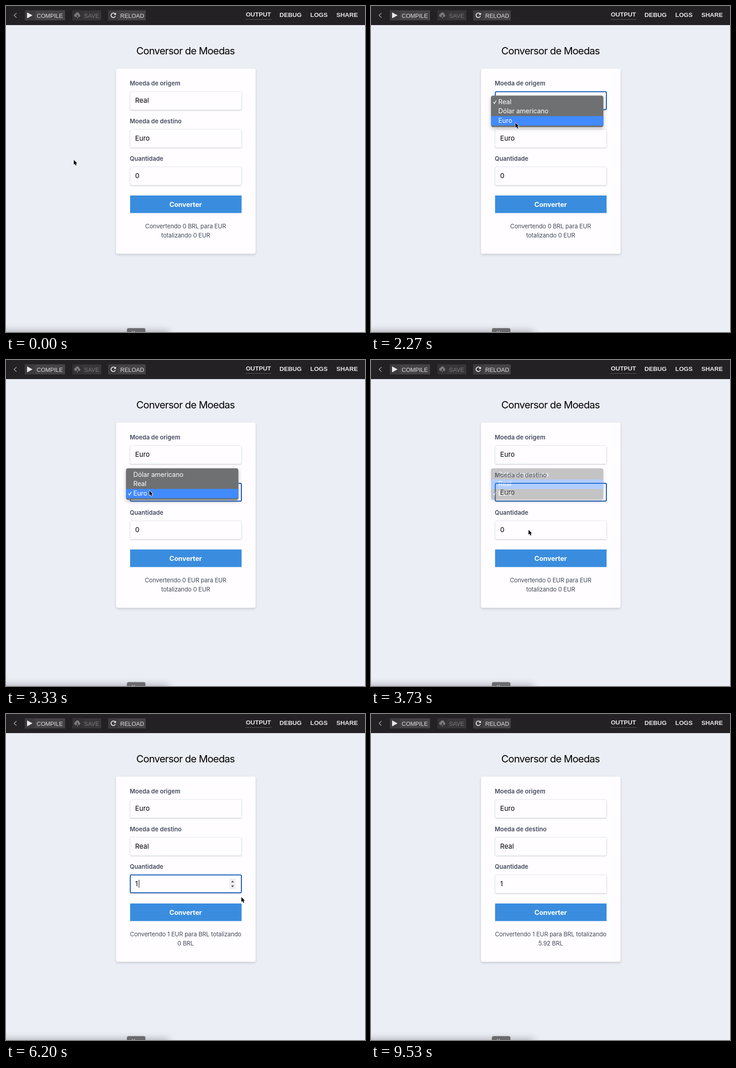
These frames come from a looping animation (784 px wide and 714 px high, 9.99 s). An HTML page:

```html
<!DOCTYPE html>
<html lang="pt">
<head>
<meta charset="utf-8">
<title>Conversor de Moedas</title>
<style>
html, body { margin: 0; width: 100%; height: 100%; overflow: hidden; background: #ebeef5 }
svg { display: block; width: 784px; height: 714px; font-family: Inter, "Noto Sans", sans-serif; font-optical-sizing: none }
text { white-space: pre }
.bar { font: 12.7px "Liberation Sans", Arial, sans-serif; fill: #dedddf }
.tab { font: bold 13.4px "Liberation Sans", Arial, sans-serif; fill: #e6e5e7 }
.label { font-size: 13.1px; font-weight: 600; fill: #434a5f }
.value { font-size: 14.8px; fill: #000 }
.result { font-size: 13px; letter-spacing: -.14px; fill: #434a5a; text-anchor: middle }
.item { font-size: 14.3px; letter-spacing: -.1px; fill: #fff }
.box { fill: #fffdff; stroke: #e1e6ef; stroke-width: 1 }
.ring { fill: none; stroke: #0d55b7; stroke-width: 2 }
</style>
</head>
<body>
<svg viewBox="0 0 784 714">
  <defs>
    <filter id="cardShadow" x="-10%" y="-10%" width="120%" height="120%">
      <feDropShadow dx="0" dy="2.5" stdDeviation="2.5" flood-color="#000" flood-opacity=".16"/>
    </filter>
    <filter id="boxShadow" x="-5%" y="-20%" width="110%" height="150%">
      <feDropShadow dx="0" dy="1.2" stdDeviation="1" flood-color="#000" flood-opacity=".17"/>
    </filter>
    <filter id="menuShadow" x="-10%" y="-20%" width="120%" height="160%">
      <feDropShadow dx="0" dy="3" stdDeviation="4" flood-color="#000" flood-opacity=".25"/>
    </filter>
    <filter id="blur" x="-20%" y="-100%" width="140%" height="300%"><feGaussianBlur stdDeviation="9"/></filter>
  </defs>

  <rect width="784" height="714" fill="#ebeef5"/>
  <rect width="784" height="41.5" fill="#232124"/>
  <path d="M0 41H784" stroke="#171518"/>
  <path d="M23 15.5L17.5 20.5L23 25.5" fill="none" stroke="#a9a8aa" stroke-width="1.4"/>
  <g fill="#454346">
    <rect x="41" y="9.5" width="88" height="22"/>
    <rect x="145" y="9.5" width="63" height="22" fill="#383639"/>
    <rect x="223" y="9.5" width="82" height="22"/>
  </g>
  <g fill="#3d3b3e">
    <rect x="41" y="9.5" width="22" height="22"/>
    <rect x="145" y="9.5" width="22" height="22" fill="#343235"/>
    <rect x="223" y="9.5" width="22" height="22"/>
  </g>
  <path d="M46 14V27L58 20.5Z" fill="#e8e7e9"/>
  <g fill="#7b797c">
    <circle cx="152.5" cy="20.5" r="3.5"/><circle cx="156" cy="17.8" r="3.8"/><circle cx="159.3" cy="21" r="3"/>
    <rect x="152" y="19" width="7.5" height="5"/>
    <path d="M155 22H157V27H155Z"/>
    <path d="M153.3 22.3L156 19.3L158.7 22.3H157V24.5H155V22.3Z" fill="#383639"/>
  </g>
  <path d="M238.3 17.3A4.9 4.9 0 1 0 239 22" fill="none" stroke="#e8e7e9" stroke-width="1.9"/>
  <path d="M240.3 14.5V19.6H235.2Z" fill="#e8e7e9"/>
  <g class="bar">
    <text x="67" y="25.6">COMPILE</text>
    <text x="170.5" y="25.6" style="fill:#7b797c">SAVE</text>
    <text x="249.5" y="25.6">RELOAD</text>
  </g>
  <g class="tab">
    <text x="523.7" y="23.2">OUTPUT</text>
    <text x="597.3" y="23.6">DEBUG</text>
    <text x="664.5" y="23.6">LOGS</text>
    <text x="721.5" y="23.6">SHARE</text>
  </g>
  <path d="M523 29.5H580" stroke="#59575a"/>

  <text x="392" y="106" font-size="22" letter-spacing="-.8" text-anchor="middle">Conversor de Moedas</text>
  <rect x="240.5" y="137" width="304.5" height="405.5" rx="4" fill="#fffdff" filter="url(#cardShadow)"/>
  <g id="fields"></g>
  <rect x="271" y="415" width="243.5" height="38.5" fill="#3a8dde"/>
  <rect id="buttonRing" class="ring" x="271" y="415.3" width="243.6" height="38" rx="1.5"/>
  <text x="392.2" y="439.7" font-size="14.6" font-weight="700" letter-spacing="-.1" fill="#fff" text-anchor="middle">Converter</text>
  <text id="line1" class="result" x="392.3" y="486.8"></text>
  <text id="line2" class="result" x="392.3" y="506.5"></text>

  <g id="spinner">
    <rect x="488" y="360.5" width="13.5" height="23" rx="1" fill="#efedef"/>
    <path d="M491.8 368.8L494.7 365L497.6 368.8ZM491.8 375.6L494.7 379.4L497.6 375.6Z" fill="#444"/>
  </g>
  <path id="caret" stroke="#000" stroke-width="1"/>
  <g id="menus"></g>

  <rect x="-40" y="713" width="395" height="40" fill="#000" opacity=".3" filter="url(#blur)"/>
  <rect x="264" y="705.5" width="40.5" height="20" rx="4" fill="#6b6b6e"/>
  <text x="274" y="721" font-size="12" fill="#eee">Kor</text>

  <g id="pointer" stroke-linejoin="round">
    <path id="arrow" d="M0 0V10.6L2.4 8.4L4.2 12.4L6.1 11.6L4.4 7.7H7.6Z" fill="#000" stroke="#fff" stroke-width="1.6" paint-order="stroke"/>
    <g id="beam" fill="none">
      <path d="M-3 -7.5Q0 -7.5 0 -5V5Q0 7.5 -3 7.5M3 -7.5Q0 -7.5 0 -5M0 5Q0 7.5 3 7.5M-1.8 2H1.8" stroke="#fff" stroke-width="2.6" opacity=".8"/>
      <path d="M-3 -7.5Q0 -7.5 0 -5V5Q0 7.5 -3 7.5M3 -7.5Q0 -7.5 0 -5M0 5Q0 7.5 3 7.5M-1.8 2H1.8" stroke="#222" stroke-width="1.1"/>
    </g>
  </g>
</svg>
<script>
const LOOP = 9990, FRAME = 200 / 3, ROW = 20.6;
const $ = id => document.getElementById(id);
const show = (el, on) => el.style.display = on ? '' : 'none';
const within = (t, a, b) => t >= a && t < b;

const labels = ['Moeda de origem', 'Moeda de destino', 'Quantidade'];
$('fields').innerHTML = labels.map((label, i) => {
  const y = 187.5 + i * 82.4;
  return `<text class="label" x="270.3" y="${y - 13.2}">${label}</text>
    <rect class="box" x="271" y="${y}" width="243.5" height="40" rx="3" filter="url(#boxShadow)"/>
    <rect class="ring" x="271.5" y="${y + .2}" width="242.5" height="39" rx="2.5"/>
    <text class="value" x="282" y="${y + 24.9}"></text>`;
}).join('');
const values = document.querySelectorAll('.value');
const rings = document.querySelectorAll('#fields .ring');

// Menus: hover lists [time, row] pairs.
const menus = [
  { y: 196.3, items: ['Real', 'Dólar americano', 'Euro'], checked: 0, open: 1065, pick: 2400,
    fade: 240, hover: [[0, 0], [1520, 1], [1860, 2]] },
  { y: 237.3, items: ['Dólar americano', 'Real', 'Euro'], checked: 2, open: 3195, pick: 3595,
    fade: 230, hover: [[0, 2], [3460, 1]] }
];
$('menus').innerHTML = menus.map(m => `<g>
  <rect x="262" y="${m.y}" width="245.5" height="69" rx="4.5" fill="#6e6f71" filter="url(#menuShadow)"/>
  <rect class="hover" x="262" width="245.5" height="${ROW}" fill="#418aff"/>
  ${m.items.map((s, i) => `<text class="item" x="278" y="${m.y + 18.4 + i * ROW}">${s}</text>`).join('')}
  <path d="M267.3 ${m.y + 14.2 + m.checked * ROW}l2.2 3l4 -6.5" fill="none" stroke="#fff" stroke-width="1.4"/>
</g>`).join('');
menus.forEach((m, i) => {
  m.el = $('menus').children[i];
  m.bar = m.el.querySelector('.hover');
});

// Pointer path: time, x, y
const path = [
  [0, 148, 337], [270, 143, 331], [600, 225, 268], [870, 300, 212], [1000, 312, 203],
  [1335, 312, 203], [1600, 319, 224], [1900, 318, 248], [2130, 316, 264], [2330, 315, 252],
  [2400, 315, 252], [2667, 312, 287], [3333, 313, 286], [3530, 322, 268], [3600, 328, 282],
  [3733, 344, 372], [4000, 351, 376], [4200, 351, 376], [4400, 351, 376], [4800, 421, 622],
  [4940, 421, 622], [5270, 520, 570], [5600, 604, 470], [5800, 604, 470], [6200, 514, 401],
  [6500, 455, 424], [6800, 423, 436], [7270, 423, 436], [7500, 396, 476], [7733, 381, 498],
  [8000, 393, 499], [8270, 402, 498], [8530, 436, 497], [8600, 436, 497], [9070, 564, 544],
  [9200, 564, 544], [9470, 618, 214], [LOOP, 618, 214]
];

function pointerAt(t) {
  const i = path.findIndex(p => p[0] > t);
  const [t0, x0, y0] = path[i - 1], [t1, x1, y1] = path[i];
  const k = (t - t0) / (t1 - t0);
  return [x0 + (x1 - x0) * k, y0 + (y1 - y0) * k];
}

function draw(t) {
  const from = t < 2590 ? 'BRL' : 'EUR', to = t < 3790 ? 'EUR' : 'BRL';
  const names = { BRL: 'Real', EUR: 'Euro' };
  const amount = t < 5190 ? '0' : '1';
  const total = t < 6990 ? '0' : '5.92';
  [names[from], names[to], amount].forEach((s, i) => values[i].textContent = s);

  const wide = amount === '1';
  $('line1').textContent = `Convertendo ${amount} ${from} para ${to}` + (wide ? ' totalizando' : '');
  $('line2').textContent = (wide ? '' : 'totalizando ') + `${total} ${to}`;

  const focus = t < 1065 ? -1 : t < 3190 ? 0 : t < 3930 ? 1 : t < 6925 ? 2 : t < 8130 ? 3 : -1;
  rings.forEach((r, i) => show(r, i === focus));
  show($('buttonRing'), focus === 3);
  show($('spinner'), focus === 2);
  show($('caret'), focus === 2 && !within(t, 4460, 4790) && !within(t, 5590, 5860));
  $('caret').setAttribute('d', `M${wide ? 290.5 : 292.5} 363V380.5`);

  for (const m of menus) {
    const alpha = Math.min(1, 1 - (t - m.pick) / m.fade);
    show(m.el, t >= m.open && alpha > 0);
    m.el.style.opacity = Math.max(0, alpha);
    const row = m.hover.filter(h => h[0] <= t).pop()[1];
    m.bar.setAttribute('y', m.y + 3.8 + row * ROW);
  }

  const beam = within(t, 3860, 4520) || within(t, 7520, 8730);
  const [x, y] = pointerAt(t);
  $('pointer').setAttribute('transform', `translate(${x} ${y})`);
  show($('pointer'), t < 9500);
  show($('beam'), beam);
  show($('arrow'), !beam);
}

const start = performance.now();
function tick() {
  const t = (performance.now() - start) % LOOP;
  draw(Math.floor((t + 4) / FRAME) * FRAME); // 15 steps a second
  requestAnimationFrame(tick);
}
tick();
</script>
</body>
</html>
```
